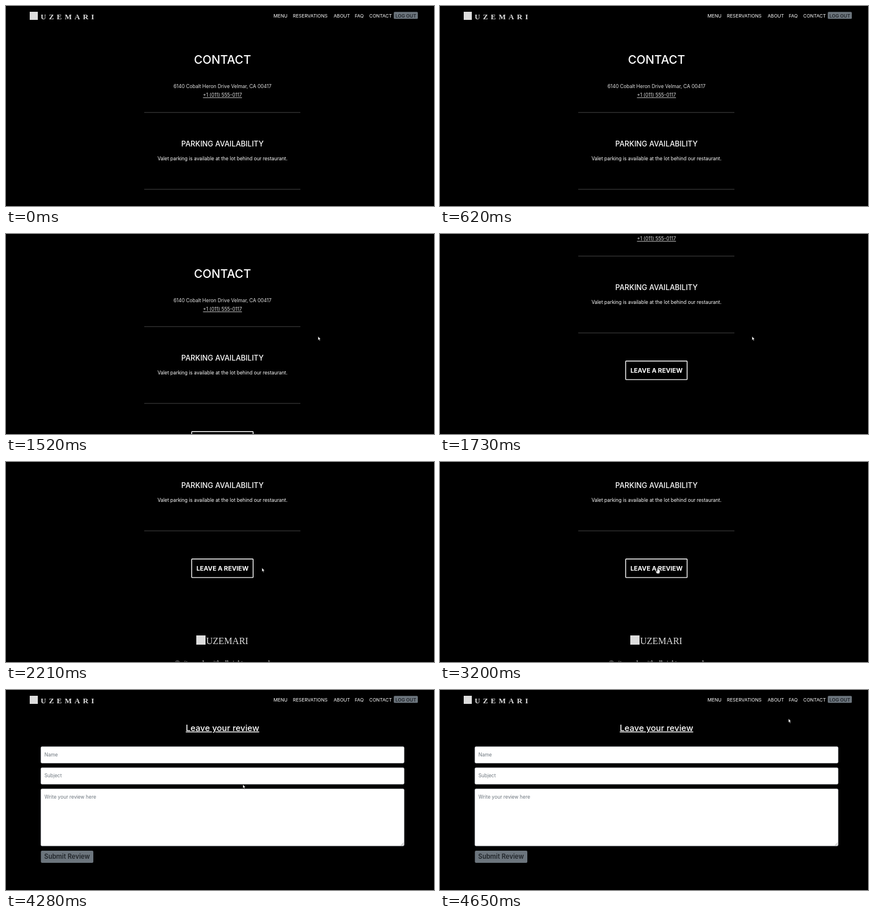
An HTML page for the animation above (4.69 s loop, 740 px wide and 346 px high).

```html
<!DOCTYPE html>
<html lang="en">
<head>
<meta charset="utf-8">
<title>Restaurant site</title>
<style>
  html, body { margin: 0; height: 100%; overflow: hidden; background: #000; }
  svg { display: block; width: 740px; height: 346px; font-family: Inter, sans-serif; font-size: 8.4px; fill: #fff; }
  .mid { text-anchor: middle; }
  .nav { font-size: 8.1px; }
  .soft { fill: #e4e4e4; }
  .under { text-decoration: underline; }
  .brand { font-family: "Liberation Serif", serif; fill: #ddd; }
  .rule { stroke: #444; }
  .grey { fill: #6c757d; }
  .ink { fill: #20252a; font-weight: 600; }
  .field { fill: #fff; stroke: #ced4da; stroke-width: .6; }
  .cursor { stroke: #000; stroke-width: .5; stroke-linejoin: round; }
</style>
</head>
<body>
<svg viewBox="0 0 740 346">
  <defs>
    <g id="header">
      <rect class="brand" x="41" y="10" width="14" height="14"/>
      <text class="brand" x="60" y="22.9" font-size="13" font-weight="700" letter-spacing="4.9">UZEMARI</text>
      <g class="nav">
        <text x="462.5" y="19.6">MENU</text>
        <text x="496" y="19.6">RESERVATIONS</text>
        <text x="566.5" y="19.6">ABOUT</text>
        <text x="603" y="19.6">FAQ</text>
        <text x="628" y="19.6">CONTACT</text>
        <rect class="grey" x="670.5" y="10.3" width="41.5" height="12" rx="1.5"/>
        <text class="ink mid" x="691.3" y="19.6">LOG OUT</text>
      </g>
    </g>
  </defs>

  <g id="contact">
    <use href="#header"/>
    <g class="mid">
      <text x="374.3" y="100.2" font-size="20.2" font-weight="500">CONTACT</text>
      <text class="soft" x="374.3" y="141.7">6140 Cobalt Heron Drive Velmar, CA 00417</text>
      <text class="soft under" x="374.3" y="157.3">+1 (011) 555-0117</text>
      <path class="rule" d="M239 184.2H509M239 317.1H509"/>
      <text x="374.3" y="243.2" font-size="12.6" font-weight="500">PARKING AVAILABILITY</text>
      <text x="374.3" y="267">Valet parking is available at the lot behind our restaurant.</text>
      <rect x="321" y="365.7" width="106.3" height="32.2" rx="1" fill="none" stroke="#fff" stroke-width="1.4"/>
      <text x="374.3" y="385.6" font-size="10.8" font-weight="700">LEAVE A REVIEW</text>
    </g>
    <rect class="brand" x="329" y="498" width="16" height="16"/>
    <text class="brand" x="346" y="512.8" font-size="16">UZEMARI</text>
    <text class="brand mid" x="374" y="549.5" font-size="11.5">© site made with all rights reserved</text>
  </g>

  <g id="review">
    <use href="#header"/>
    <text class="mid under" x="374.3" y="70.8" font-size="14.6" font-weight="500">Leave your review</text>
    <rect class="field" x="60.3" y="98" width="628" height="28.4" rx="2"/>
    <rect class="field" x="60.3" y="134.4" width="628" height="28.6" rx="2"/>
    <rect class="field" x="60.3" y="171" width="628" height="98.8" rx="2"/>
    <path d="M683 269L687.5 264.5M685.5 269L687.5 267" stroke="#666" stroke-width=".6"/>
    <g class="grey">
      <text x="66.5" y="115">Name</text>
      <text x="66.5" y="151.3">Subject</text>
      <text x="66.5" y="188">Write your review here</text>
      <rect x="60.3" y="278" width="90.7" height="21" rx="2"/>
    </g>
    <text class="ink mid" x="105.5" y="292" font-size="11.1">Submit Review</text>
  </g>

  <path id="arrow" class="cursor" d="M0 0V6.7L1.5 5.4L2.6 7.9L3.7 7.4L2.6 5H4.6Z"/>
  <path id="hand" class="cursor" d="M-.8 .6Q0-.5 .8 .6V3.6Q1.6 3 2.1 3.8Q2.9 3.4 3.3 4.3Q4.2 4.1 4.2 5V7.4L3.3 10.5H-1.2L-3.2 6.8Q-3.4 5.6-2.3 5.9L-.8 7Z"/>
</svg>
<script>
  const LOOP = 4690, REVIEW_AT = 3300, LEAVE_AT = 4280;
  const byId = id => document.getElementById(id);
  const [contact, review, arrow, hand] = ["contact", "review", "arrow", "hand"].map(byId);

  // Each entry is [start ms, ...values], held until the next entry.
  const scrollSteps = [[0, 0], [1520, 24], [1620, 88], [1730, 146], [1810, 180], [1910, 195], [2010, 198]];
  const cursorSteps = [
    [900, 618, 118], [1000, 580, 150], [1110, 549, 171], [1220, 539.5, 177],
    [2110, 502, 179], [2210, 442.5, 183], [2310, 405, 184], [2410, 385, 183], [2510, 376, 182.5]
  ];
  const held = (steps, t) => steps.findLast(step => step[0] <= t)?.slice(1);
  const show = (el, on) => el.style.display = on ? "" : "none";

  function cursorAt(t) {
    if (t < REVIEW_AT) return held(cursorSteps, t);
    if (t < LEAVE_AT) return null;
    const p = Math.min(1, (Math.floor((t - LEAVE_AT) / 30.8) + 1) / 13);
    const ease = 1 - (1 - p) ** 2;
    return [376 + 226.5 * ease, 183 - 133.5 * ease];
  }

  function draw(t) {
    const onReview = t >= REVIEW_AT;
    show(contact, !onReview);
    show(review, onReview);
    contact.setAttribute("transform", `translate(0 ${-held(scrollSteps, t)[0]})`);

    const point = cursorAt(t);
    const overButton = !onReview && t > 2010 && point[0] < 427;
    show(arrow, point && !overButton);
    show(hand, point && overButton);
    if (point) for (const el of [arrow, hand]) el.setAttribute("transform", `translate(${point})`);
  }

  const start = performance.now();
  function tick() {
    draw((performance.now() - start) % LOOP);
    requestAnimationFrame(tick);
  }
  tick();
</script>
</body>
</html>
```
